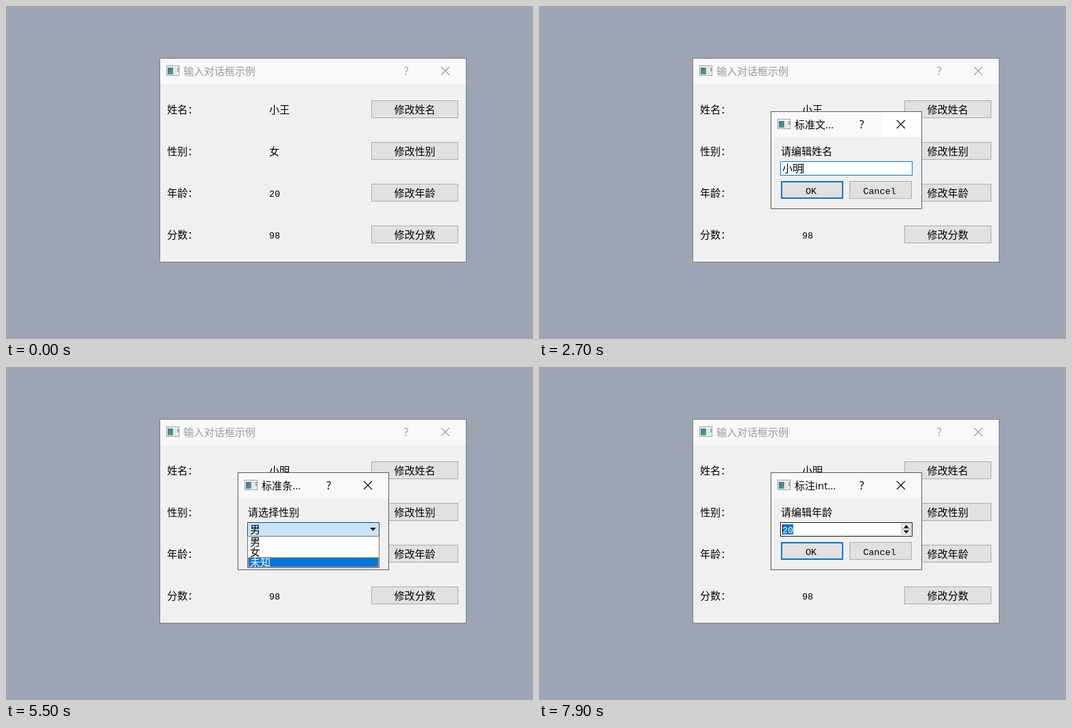
Recreate the animation shown at these times as an HTML page. Size 769 by 487 pixels, loop 8000 ms.

```html
<!DOCTYPE html>
<html lang="zh">
<head>
<meta charset="utf-8">
<title>输入对话框示例</title>
<style>
html, body { margin: 0; width: 100%; height: 100%; overflow: hidden; background: #9da5b4; }
svg { display: block; width: 769px; height: 487px; }
text { font: 300 15px 'Noto Sans CJK SC', 'Noto Sans CJK', sans-serif; fill: #000; white-space: pre; }
.mono { font: 13.33px 'Liberation Mono', monospace; }
.title { font: 15px 'Open Sans', 'Noto Sans CJK SC', 'Noto Sans CJK', sans-serif; }
.mid { text-anchor: middle; }
.white { fill: #fff; }
.btn { fill: #e1e1e1; stroke: #adadad; }
.focus { fill: none; stroke: #0078d7; stroke-width: 2; }
.field { fill: #fff; stroke: #0078d7; }
.sel { fill: #0078d7; }
.frame { fill: #f0f0f0; stroke: #5c5c5c; }
.bar { fill: #f9f9fa; }
.cross { fill: none; stroke: #000; stroke-width: 1.1; }
.grey text { fill: #999; }
.grey .cross { stroke: #999; }
.grey .frame { stroke: #777c86; }

/* every state is held until the next key; 1.25% is one tenth of a second */
.a { animation: 8s step-end -10ms infinite; }
.dialog { opacity: 0; transform-origin: 448.5px 225.5px; }

#active { opacity: 0; animation-name: active; }
@keyframes active { 0%, 8.75%, 50%, 87.5% { opacity: 0 } 6.25%, 36.25%, 78.75% { opacity: 1 } }

#b1 { animation-name: b1; }
@keyframes b1 {
  0%, 10% { fill: #e1e1e1; stroke: #adadad }
  1.25%, 8.75% { fill: #e3e9ee; stroke: #5793c2 }
  2.5% { fill: #e5f1fb; stroke: #0078d7 }
  6.25% { fill: #cce4f7; stroke: #005499 }
}
#b2 { animation-name: b2; }
@keyframes b2 {
  0%, 51.25% { fill: #e1e1e1; stroke: #adadad }
  46.25%, 50% { fill: #e3e9ee; stroke: #5793c2 }
  47.5% { fill: #e5f1fb; stroke: #0078d7 }
  48.75% { fill: #cce4f7; stroke: #005499 }
}
#b3 { animation-name: b3; }
@keyframes b3 {
  0%, 88.75% { fill: #e1e1e1; stroke: #adadad }
  82.5%, 87.5% { fill: #e3e9ee; stroke: #5793c2 }
  83.75% { fill: #e5f1fb; stroke: #0078d7 }
  86.25% { fill: #cce4f7; stroke: #005499 }
}
#focus1 { opacity: 0; animation-name: focus1; }
@keyframes focus1 { 0%, 48.75% { opacity: 0 } 36.25% { opacity: 1 } }
#focus2 { opacity: 0; animation-name: focus2; }
@keyframes focus2 { 0%, 86.25% { opacity: 0 } 78.75% { opacity: 1 } }

#name1 { animation-name: name1; }
@keyframes name1 { 0% { opacity: 1 } 36.25% { opacity: 0 } 100% { opacity: 0 } }
#name2 { animation-name: name2; }
@keyframes name2 { 0% { opacity: 0 } 36.25% { opacity: 1 } }
#sex1 { animation-name: sex1; }
@keyframes sex1 { 0% { opacity: 1 } 78.75% { opacity: 0 } }
#sex2 { animation-name: sex2; }
@keyframes sex2 { 0% { opacity: 0 } 78.75% { opacity: 1 } }

#nameBox { animation-name: nameBox; }
@keyframes nameBox {
  0%, 38.75% { opacity: 0; transform: none }
  8.75% { opacity: .3; transform: scale(.94) }
  10% { opacity: .8; transform: scale(.985) }
  11.25% { opacity: 1; transform: none }
  36.25% { opacity: .6; transform: scale(.985) }
  37.5% { opacity: .25; transform: scale(.964) }
}
#sexBox { animation-name: sexBox; }
@keyframes sexBox {
  0%, 81.25% { opacity: 0; transform: none }
  50% { opacity: .3; transform: scale(.94) }
  51.25% { opacity: .8; transform: scale(.985) }
  52.5% { opacity: 1; transform: none }
  78.75% { opacity: .6; transform: scale(.985) }
  80% { opacity: .25; transform: scale(.964) }
}
#ageBox { animation-name: ageBox; }
@keyframes ageBox {
  0% { opacity: 0; transform: none }
  87.5% { opacity: .35; transform: scale(.95) }
  88.75% { opacity: .85; transform: scale(.988) }
  90% { opacity: 1; transform: none }
}
#nameSigns { animation-name: nameSigns; }
@keyframes nameSigns { 0% { opacity: 1 } 36.25% { opacity: .1 } }
#sexSigns { animation-name: sexSigns; }
@keyframes sexSigns { 0% { opacity: 1 } 78.75% { opacity: .1 } }

#oldName { animation-name: oldName; }
@keyframes oldName { 0% { opacity: 1 } 17.5% { opacity: 0 } }
#typing { animation-name: typing; }
@keyframes typing { 0%, 33.75% { opacity: 0 } 17.5% { opacity: 1 } }
#cover { animation-name: cover; }
@keyframes cover {
  0% { transform: none }
  23.75% { transform: translateX(8px) }
  25% { transform: translateX(16px) }
  28.75% { transform: translateX(24px) }
  30% { transform: translateX(40px) }
  31.25% { transform: translateX(56px) }
  32.5% { transform: translateX(64px) }
}
#newName { animation-name: newName; }
@keyframes newName { 0% { opacity: 0 } 33.75% { opacity: 1 } }
#picks { opacity: 0; animation-name: picks; }
@keyframes picks { 0%, 33.75% { opacity: 0 } 17.5% { opacity: .5 } 18.75% { opacity: .9 } 20% { opacity: 1 } }
#picks1 { animation-name: picks1; }
@keyframes picks1 { 0% { opacity: 1 } 23.75% { opacity: 0 } }
#picks2 { animation-name: picks2; }
@keyframes picks2 { 0%, 28.75% { opacity: 0 } 23.75% { opacity: 1 } }
#picks3 { animation-name: picks3; }
@keyframes picks3 { 0% { opacity: 0 } 28.75% { opacity: 1 } }

#combo { animation-name: combo; }
@keyframes combo {
  0%, 57.5%, 75% { fill: #dfe6ec; stroke: #6b9bc5 }
  55%, 76.25% { fill: #e1e1e1; stroke: #adadad }
  58.75%, 73.75% { fill: #e5f1fb; stroke: #0078d7 }
  60% { fill: #cce4f7; stroke: #005499 }
}
#male { animation-name: male; }
@keyframes male { 0% { opacity: 1 } 72.5% { opacity: 0 } }
#unknown { animation-name: unknown; }
@keyframes unknown { 0% { opacity: 0 } 72.5% { opacity: 1 } }
#list { animation-name: list; }
@keyframes list { 0%, 72.5% { opacity: 0 } 61.25% { opacity: 1 } }
#hit1 { animation-name: hit1; }
@keyframes hit1 { 0% { opacity: 1 } 62.5% { opacity: 0 } }
#hit2 { animation-name: hit2; }
@keyframes hit2 { 0%, 68.75% { opacity: 0 } 62.5% { opacity: 1 } }
#hit3 { animation-name: hit3; }
@keyframes hit3 { 0% { opacity: 0 } 68.75% { opacity: 1 } }
#okHover { animation-name: okHover; }
@keyframes okHover { 0% { opacity: 0 } 76.25% { opacity: 1 } }

#spin { animation-name: spin; }
@keyframes spin { 0% { stroke: #0078d7 } 96.25% { stroke: #171717 } }
#caret { animation-name: caret; }
@keyframes caret { 0%, 98.75% { opacity: 1 } 92.5% { opacity: 0 } }
</style>
</head>
<body>
<svg viewBox="0 0 769 487">
  <defs>
    <linearGradient id="teal" x2="1" y2="1">
      <stop offset="0" stop-color="#3f6fa0"/><stop offset="1" stop-color="#58a878"/>
    </linearGradient>
    <g id="icon">
      <rect x=".5" y=".5" width="18" height="14" fill="#f4f5f6" stroke="#989da3"/>
      <rect x="2" y="3" width="8" height="10" fill="url(#teal)"/>
      <rect x="11" y="3" width="4" height="10" fill="#e3e6e9"/>
      <rect x="16" y="3" width="1.5" height="6" fill="#6f9f9a"/>
    </g>
    <path id="cross" d="M0 0L12 12M12 0L0 12"/>
    <g id="shell">
      <rect class="frame" x="338.5" y="154.5" width="220" height="142"/>
      <rect class="bar" x="339" y="155" width="219" height="37"/>
      <use href="#icon" x="348" y="165"/>
    </g>
    <g id="signs">
      <text class="title mid" x="471" y="179" style="font-size:16px">?</text>
      <use href="#cross" class="cross" x="522" y="167"/>
    </g>
    <g id="answers">
      <rect x="354" y="257" width="89" height="24" fill="#e1e1e1" stroke="#0078d7" stroke-width="2"/>
      <rect class="btn" x="453.5" y="256.5" width="90" height="25"/>
      <text class="mono mid" x="397" y="275">OK</text>
      <text class="mono mid" x="497" y="275">Cancel</text>
    </g>
    <g id="head">
      <use href="#icon" x="234" y="87"/>
      <text class="title" x="259" y="101">输入对话框示例</text>
      <text class="title mid" x="584" y="101" style="font-size:16px">?</text>
      <use href="#cross" class="cross" x="635" y="89"/>
    </g>
    <rect id="hit" class="sel" x="353.5" y="248.5" width="190" height="14" stroke="#ff8728" stroke-dasharray="1 1"/>
  </defs>

  <rect width="769" height="487" fill="#9da5b4"/>

  <!-- main window -->
  <g class="grey">
    <rect class="frame" x="224.5" y="76.5" width="447" height="298"/>
    <rect class="bar" x="225" y="77" width="446" height="37"/>
    <use href="#head"/>
    <text class="title" x="259" y="101" style="display:none"></text>
  </g>
  <g id="inactive">
    <rect class="bar" x="255" y="80" width="410" height="32"/>
    <g class="grey">
      <text class="title" x="259" y="101">输入对话框示例</text>
      <text class="title mid" x="584" y="101" style="font-size:16px">?</text>
      <use href="#cross" class="cross" x="635" y="89"/>
    </g>
  </g>
  <g id="active" class="a">
    <rect class="bar" x="225" y="77" width="446" height="37"/>
    <rect x="224.5" y="76.5" width="447" height="298" fill="none" stroke="#505359"/>
    <use href="#head"/>
  </g>

  <text x="235" y="157">姓名：</text>
  <text x="235" y="218">性别：</text>
  <text x="235" y="279">年龄：</text>
  <text x="235" y="340">分数：</text>
  <text id="name1" class="a" x="384" y="157">小王</text>
  <text id="name2" class="a" x="384" y="157">小明</text>
  <text id="sex1" class="a" x="384" y="218">女</text>
  <text id="sex2" class="a" x="384" y="218">未知</text>
  <text class="mono" x="384" y="279">20</text>
  <text class="mono" x="384" y="340">98</text>

  <rect id="b1" class="btn a" x="533.5" y="138.5" width="126" height="25"/>
  <rect id="b2" class="btn a" x="533.5" y="199.5" width="126" height="25"/>
  <rect id="b3" class="btn a" x="533.5" y="260.5" width="126" height="25"/>
  <rect class="btn" x="533.5" y="321.5" width="126" height="25"/>
  <rect id="focus1" class="focus a" x="534" y="139" width="125" height="24"/>
  <rect id="focus2" class="focus a" x="534" y="200" width="125" height="24"/>
  <text class="mid" x="596.5" y="157">修改姓名</text>
  <text class="mid" x="596.5" y="218">修改性别</text>
  <text class="mid" x="596.5" y="279">修改年龄</text>
  <text class="mid" x="596.5" y="340">修改分数</text>

  <!-- name dialog -->
  <g id="nameBox" class="dialog a">
    <use href="#shell"/>
    <rect class="white" x="500" y="155" width="58" height="36"/>
    <g id="nameSigns" class="a"><use href="#signs"/></g>
    <text class="title" x="373" y="179">标准文...</text>
    <text x="353" y="218">请编辑姓名</text>
    <rect class="field" x="352.5" y="227.5" width="192" height="20"/>
    <g id="oldName" class="a">
      <rect class="sel" x="355" y="230" width="30" height="15"/>
      <text class="white" x="355" y="243">小王</text>
    </g>
    <g id="typing" class="a">
      <text class="mono" x="355" y="242">xiao'ming</text>
      <path d="M355 245.5H427" stroke="#000" stroke-dasharray="1 1"/>
      <g id="cover" class="a">
        <rect class="white" x="363" y="229" width="110" height="18"/>
        <rect x="363" y="230" width="1" height="15"/>
      </g>
    </g>
    <g id="newName" class="a">
      <text x="355" y="243">小明</text>
      <rect x="385" y="230" width="1" height="15"/>
    </g>
    <use href="#answers"/>
  </g>
  <g id="picks" class="a">
    <rect x="356.5" y="253.5" width="414" height="39" fill="#fff" stroke="#c8c8c8"/>
    <text id="picks1" class="title a" x="366" y="279">1 想    2 小    3 下    4 新    5 像    6 向    7 些</text>
    <text id="picks2" class="title a" x="366" y="279">1 下    2 夏    3 系    4 西    5 洗    6 喜    7 细</text>
    <g id="picks3" class="a">
      <rect x="356.5" y="253.5" width="414" height="65" fill="#fff" stroke="#c8c8c8"/>
      <text class="title" x="366" y="279">1 小明    2 小名    3 晓明    4 小    5 笑    6 校</text>
    </g>
  </g>

  <!-- gender dialog -->
  <g id="sexBox" class="dialog a">
    <use href="#shell"/>
    <g id="sexSigns" class="a"><use href="#signs"/></g>
    <text class="title" x="373" y="179">标准条...</text>
    <text x="353" y="218">请选择性别</text>
    <rect id="combo" class="a" x="352.5" y="227.5" width="192" height="20"/>
    <path d="M531 235H540L535.5 239.5Z"/>
    <text id="male" class="a" x="356" y="243">男</text>
    <text id="unknown" class="a" x="356" y="243">未知</text>
    <use href="#answers"/>
    <g id="okHover" class="a">
      <rect x="353.5" y="256.5" width="90" height="25" fill="#e5f1fb" stroke="#0078d7"/>
      <text class="mono mid" x="397" y="275">OK</text>
    </g>
    <g id="list" class="a">
      <rect x="352.5" y="247.5" width="192" height="46" fill="#fff" stroke="#707070"/>
      <text x="356" y="261">男</text>
      <text x="356" y="276">女</text>
      <text x="356" y="291">未知</text>
      <g id="hit1" class="a"><use href="#hit"/><text class="white" x="356" y="261">男</text></g>
      <g id="hit2" class="a"><use href="#hit" y="15"/><text class="white" x="356" y="276">女</text></g>
      <g id="hit3" class="a"><use href="#hit" y="30"/><text class="white" x="356" y="291">未知</text></g>
    </g>
  </g>

  <!-- age dialog -->
  <g id="ageBox" class="dialog a">
    <use href="#shell"/>
    <use href="#signs"/>
    <text class="title" x="373" y="179">标注int...</text>
    <text x="353" y="218">请编辑年龄</text>
    <rect id="spin" class="field a" x="352.5" y="227.5" width="192" height="20"/>
    <rect class="sel" x="355" y="230" width="16" height="15"/>
    <text class="mono white" x="355" y="243">20</text>
    <rect id="caret" class="a" x="355" y="230" width="1" height="15"/>
    <path d="M529.5 229.5h13v7h-13zM529.5 237.5h13v7h-13z" fill="#f0f0f0" stroke="#bcbcbc"/>
    <path d="M532 235.5H540L536 231ZM532 239H540L536 243.5Z"/>
    <use href="#answers"/>
  </g>
</svg>
</body>
</html>
```
